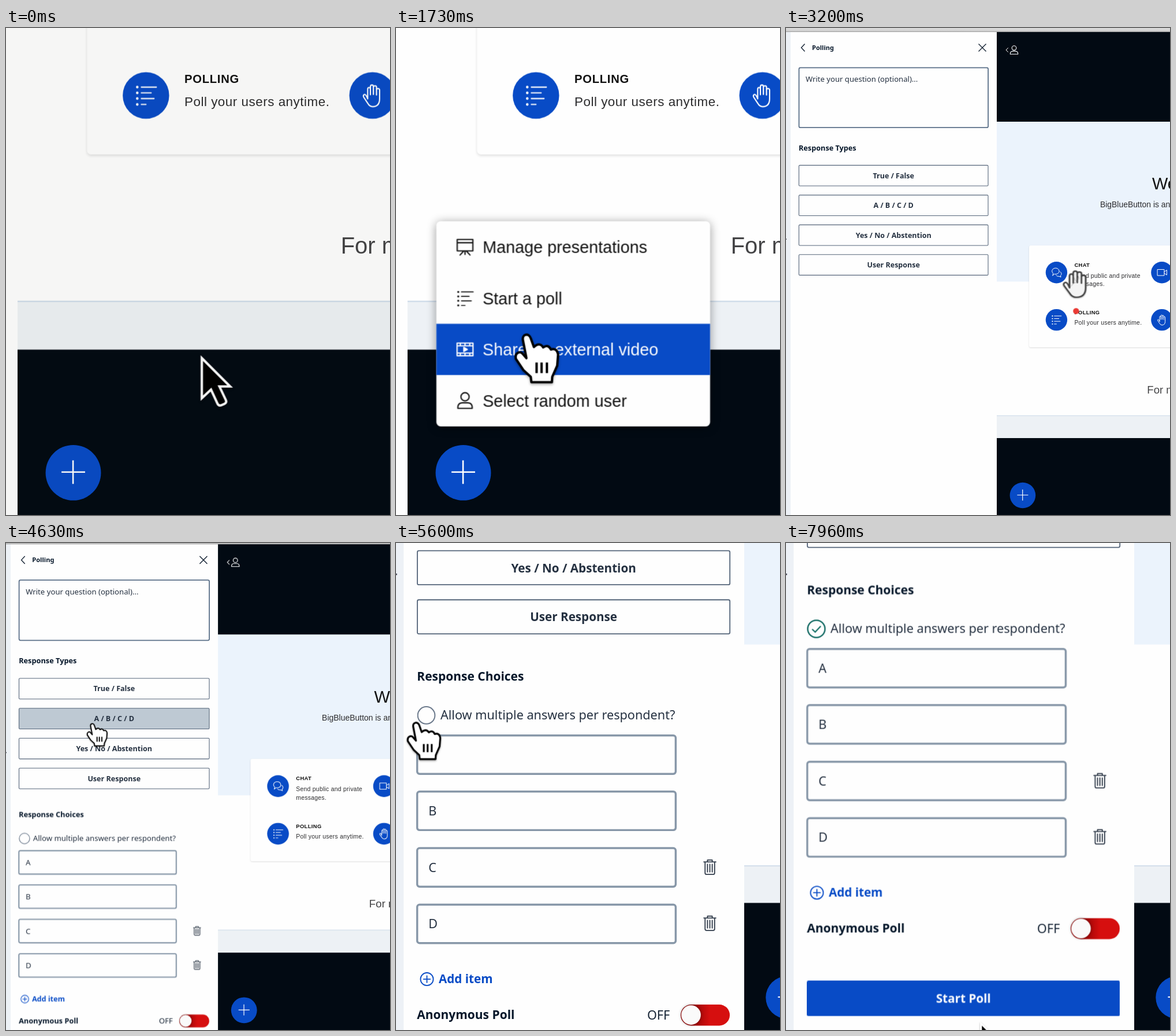
Recreate the animation shown at these times as an HTML page. Size 665 by 842 pixels, loop 8 s.

```html
<!DOCTYPE html>
<html lang="en">
<head>
<meta charset="utf-8">
<title>Starting a poll</title>
<style>
html, body { margin: 0; width: 100%; height: 100%; overflow: hidden; background: #fefefe; }
svg { display: block; }
text { white-space: pre; }
.slide { font-family: "Liberation Sans", Arial, sans-serif; fill: #2c2c2e; }
.panel { font-family: "Noto Sans", sans-serif; font-size: 13.1px; fill: #253141; }
.b { font-weight: 600; font-size: 12.5px; }
.head { fill: #06172a; font-size: 12.7px; }
.mid { text-anchor: middle; }
.tag { font-weight: 700; font-size: 9.4px; letter-spacing: .35px; fill: #111; }
.note { font-size: 10.4px; letter-spacing: .25px; }
.item { font: 13.4px "Liberation Sans", Arial, sans-serif; fill: currentColor; }
.line { fill: none; stroke: currentColor; stroke-linecap: round; stroke-linejoin: round; }
.btn { fill: #fefefe; stroke: #55657a; stroke-width: 1.1; }
.field { fill: #fefefe; stroke: #8797a8; stroke-width: 2.1; }

.cam, .cur, .dot, .menu, .scroll, .veil { animation: 8s infinite; }
.step { animation: 8s step-end infinite; }
.cam { animation-name: cam; }
.cur { animation-name: cur; animation-timing-function: cubic-bezier(.455, .03, .515, .955); }
.dot { animation-name: dot; animation-timing-function: linear; }
.menu { animation-name: menu; transform-origin: 410px 771px; }
.scroll { animation-name: scroll; animation-timing-function: ease-out; }
.veil { animation-name: veil; animation-timing-function: linear; }
.arrow { animation-name: arrow; }
.point { animation-name: point; }
.grab { animation-name: grab; }
.hot2 { animation-name: hot2; }
.hot3 { animation-name: hot3; }
.hot4 { animation-name: hot4; }
.pick { animation-name: pick; }
.choices { animation-name: choices; }
.tick { animation-name: tick; }

/* each zoom is a quadratic ease-in half followed by an ease-out half */
@keyframes cam {
  0%, 27.5% { transform: translate(-764.75px, -968.3px) scale(2.15); animation-timing-function: cubic-bezier(.3333, 0, .6667, .3333); }
  33.75% { transform: translate(-382.4px, -484.15px) scale(1.575); animation-timing-function: cubic-bezier(.3333, .6667, .6667, 1); }
  40%, 57.06% { transform: translate(0, 0) scale(1); animation-timing-function: cubic-bezier(.3333, 0, .6667, .3333); }
  63.31% { transform: translate(0, -274.5px) scale(1.326); animation-timing-function: cubic-bezier(.3333, .6667, .6667, 1); }
  69.56%, 100% { transform: translate(0, -549px) scale(1.652); }
}
@keyframes cur {
  0%, .5% { transform: translate(512.4px, 713.6px); }
  7.5%, 16.75% { transform: translate(411px, 807px); }
  23.25% { transform: translate(469.2px, 683px); }
  34.4% { transform: translate(469.2px, 683px); animation-timing-function: cubic-bezier(.3333, 0, .6667, .3333); }
  40% { transform: translate(502px, 440px); animation-timing-function: cubic-bezier(.3333, .6667, .6667, 1); }
  46.3%, 49.3% { transform: translate(150px, 332px); }
  52.5%, 57.3% { transform: translate(150px, 312px); }
  63.75% { transform: translate(148.5px, 534px); }
  70% { transform: translate(22.4px, 521.2px); }
  71.9%, 81.5% { transform: translate(32px, 508px); }
  85.1%, 95.2% { transform: translate(218.5px, 614px); }
  99.5%, 100% { transform: translate(203.4px, 833px); }
}
@keyframes dot {
  0%, 36.2% { transform: translate(478px, 665px); opacity: 0; }
  36.21% { transform: translate(478px, 665px); opacity: 1; }
  40% { transform: translate(503px, 490px); opacity: 1; }
  41.4% { transform: translate(430px, 425px); opacity: 1; }
  41.41%, 100% { transform: translate(430px, 425px); opacity: 0; }
}
@keyframes menu {
  0%, 8.5% { opacity: 0; transform: scale(.85); }
  10.5%, 27.5% { opacity: 1; transform: none; }
  29%, 100% { opacity: 0; transform: none; }
}
@keyframes scroll {
  0%, 87.5% { transform: translateY(0); }
  89.5%, 100% { transform: translateY(-90.5px); }
}
@keyframes veil { 0%, .75% { opacity: .035; } 6%, 100% { opacity: 0; } }
@keyframes arrow {
  0% { opacity: 1; } 6.25% { opacity: 0; } 8.5% { opacity: 1; }
  19.4% { opacity: 0; } 25.75% { opacity: 1; }
  35.63% { opacity: 0; } 41.4% { opacity: 1; }
  50.6% { opacity: 0; } 58.6% { opacity: 1; }
  68.5% { opacity: 0; } 82.5%, 100% { opacity: 1; }
}
@keyframes point {
  0% { opacity: 0; } 6.25% { opacity: 1; } 8.5% { opacity: 0; }
  19.4% { opacity: 1; } 25.75% { opacity: 0; }
  50.6% { opacity: 1; } 58.6% { opacity: 0; }
  68.5% { opacity: 1; } 82.5%, 100% { opacity: 0; }
}
@keyframes grab { 0% { opacity: 0; } 35.63% { opacity: 1; } 41.4%, 100% { opacity: 0; } }
@keyframes hot4 { 0% { opacity: 0; } 19.4% { opacity: 1; } 20.6%, 100% { opacity: 0; } }
@keyframes hot3 { 0% { opacity: 0; } 20.6% { opacity: 1; } 22.4%, 100% { opacity: 0; } }
@keyframes hot2 { 0% { opacity: 0; } 22.4%, 100% { opacity: 1; } }
@keyframes pick { 0% { fill: #fefefe; } 50.6% { fill: #dce4ec; } 54.45%, 100% { fill: #bec9d3; } }
@keyframes choices { 0% { opacity: 0; } 54.45%, 100% { opacity: 1; } }
@keyframes tick { 0% { opacity: 0; } 76.2%, 100% { opacity: 1; } }
</style>
</head>
<body>
<svg width="665" height="842" viewBox="0 0 665 842">
  <defs>
    <linearGradient id="bar" x2="0" y2="1">
      <stop offset="0" stop-color="#dcdcdc"/><stop offset=".7" stop-color="#d2d2d2"/><stop offset="1" stop-color="#9a9a9a"/>
    </linearGradient>
    <linearGradient id="red">
      <stop offset=".35" stop-color="#a80808"/><stop offset=".6" stop-color="#d60f0f"/>
    </linearGradient>
    <path id="palm" stroke-linecap="round" stroke-linejoin="round" d="M-4 2.5V-5.2Q-4-6.6-2.9-6.6T-1.8-5.2V-.8M-1.8-5.5V-7.2Q-1.8-8.6-.6-8.6T.6-7.2V-1M.6-6.6Q.6-8 1.9-8T3.1-6.6V-.6M3.1-4.6Q3.1-5.8 4.3-5.8T5.6-4.6V2.5Q5.6 8.8 0 8.8Q-2.5 8.8-4 6L-7.2 1.2Q-8-.4-6.6-1Q-5.4-1.3-4 2.5"/>
    <g id="list">
      <path class="line" d="M-3.7-6.7H8.4M-3.7-2.1H4.2M-3.7 2.5H6.5M-3.7 7.2H0"/>
      <path class="line" stroke-width="2.1" d="M-7-6.7h.01M-7-2.1h.01M-7 2.5h.01M-7 7.2h.01"/>
    </g>
    <g id="user" class="line">
      <circle cy="-3" r="3.3"/><path d="M-5.8 6.3Q-6 1.8-2 1.8H2Q6 1.8 5.8 6.3Z"/>
    </g>
    <g id="bin" class="line" stroke-width="1.1">
      <path d="M-6.3-5.5H6.3M-2.5-5.5V-7.5H2.5V-5.5M-5-5.5V6Q-5 7.5-3.5 7.5H3.5Q5 7.5 5 6V-5.5M-2.5-3V5M0-3V5M2.5-3V5"/>
    </g>
    <g id="r1">
      <g class="line" transform="translate(411.3 626.4)"><path d="M-6.3-6H6.3V3.2H-6.3ZM-6.3-3.4H6.3M0 3.2V6M-4 6.5L-1.2 3.4M4 6.5L1.2 3.4"/></g>
      <text class="item" x="425.5" y="631">Manage presentations</text>
    </g>
    <g id="r2">
      <use href="#list" transform="translate(411.3 667.8) scale(.78)"/>
      <text class="item" x="425.5" y="672.4">Start a poll</text>
    </g>
    <g id="r3">
      <g class="line" transform="translate(411.3 708.7)">
        <path d="M-6.4-5H6.4V5.2H-6.4ZM-6.4-2.8H6.4M-6.4 3H6.4M-3.8-5V-2.8M0-5V-2.8M3.8-5V-2.8M-3.8 3V5.2M0 3V5.2M3.8 3V5.2"/>
        <path d="M-1-1.5L1.8.1L-1 1.7Z" fill="currentColor"/>
      </g>
      <text class="item" x="425.5" y="713.6">Share an external video</text>
    </g>
    <g id="r4">
      <use href="#user" transform="translate(411.3 749.9)"/>
      <text class="item" x="425.5" y="754.8">Select random user</text>
    </g>
  </defs>

  <rect width="665" height="842" fill="#fefefe"/>
  <g class="cam">
    <!-- presentation -->
    <g class="slide">
      <rect x="365" y="6" width="305" height="157" fill="#020a13"/>
      <rect x="365" y="162" width="305" height="276.5" fill="#ebf3fc"/>
      <rect x="365" y="670" width="305" height="40" fill="#edf1f5"/>
      <rect x="365" y="669.7" width="305" height="1" fill="#cbd9e8"/>
      <rect x="365" y="709" width="305" height="140" fill="#020a13"/>
      <g color="#fff">
        <path class="line" d="M384.5 34.5L381 38L384.5 41.5"/>
        <use href="#user" transform="translate(395 38) scale(1.15)"/>
      </g>
      <text x="634" y="279" font-size="29" fill="#111">Welcome</text>
      <text x="544" y="310" font-size="13.9">BigBlueButton is an</text>
      <rect x="421" y="376" width="270" height="176" rx="3" fill="#fefefe" style="filter:drop-shadow(0 1px 1.2px #0002)"/>
      <g fill="#084bc6">
        <circle cx="468.4" cy="422.7" r="18.7"/><circle cx="468.4" cy="504.6" r="18.7"/>
        <circle cx="650.9" cy="422.7" r="18.7"/><circle cx="650.9" cy="504.6" r="18.7"/>
      </g>
      <g color="#fff">
        <g class="line" transform="translate(468.4 422.7)">
          <path d="M-6.6 5.2L-5.6 1.6C-10-2-7-7.6-1.6-7.6C5-7.6 7 0 1.2 2.4Q-1.5 3.2-3.6 2.8Z"/>
          <path d="M6.2-1.4C9.4.6 9.2 3.8 7 5.4L7.6 8L4.6 6.6C2 7 .2 6 -.6 4.8"/>
        </g>
        <use href="#list" transform="translate(468.4 504.6)"/>
        <path class="line" d="M643.5 417.5H655V428H643.5ZM655 421.5L659.5 418.5V427L655 424"/>
        <use href="#palm" class="line" x="651" y="504.8"/>
      </g>
      <text class="tag" x="499.4" y="412.6">CHAT</text>
      <text class="note" x="499.4" y="431.5">Send public and private</text>
      <text class="note" x="499.4" y="446.3">messages.</text>
      <text class="tag" x="499.4" y="494.5">POLLING</text>
      <text class="note" x="499.4" y="513">Poll your users anytime.</text>
      <text x="625.3" y="631.7" font-size="18.6" fill="#434345">For more information</text>
    </g>
    <circle cx="409.9" cy="808" r="22.3" fill="#084bc6"/>
    <path d="M400.4 807.5H419.4M409.7 798V817" stroke="#fff" stroke-width="1.2"/>

    <!-- poll panel -->
    <rect x="-5" width="370" height="850" fill="#fefefe"/>
    <rect x="-5" width="13" height="850" fill="#edf1f6"/>
    <rect x="-1" y="364.3" width="2" height="1.6" fill="#334"/>
    <g class="panel scroll">
      <path d="M32.5 27.5L26.5 34L32.5 40.5M333.5 27.5L346.5 40.5M346.5 27.5L333.5 40.5" fill="none" stroke="#142233" stroke-width="1.4"/>
      <text class="b head" x="45" y="38" style="font-size:11px">Polling</text>
      <rect x="22.5" y="68.6" width="327.6" height="103.6" rx="2.5" fill="#fefefe" stroke="#5b7089" stroke-width="1.8"/>
      <text x="34" y="93.3">Write your question (optional)...</text>
      <text class="b head" x="22" y="211.5">Response Types</text>
      <g class="b mid">
        <rect class="btn" x="22.4" y="237.4" width="327.6" height="35.6" rx="1.5"/>
        <rect class="btn step pick" x="22.4" y="288.9" width="327.6" height="35.6" rx="1.5"/>
        <rect class="btn" x="22.4" y="340.4" width="327.6" height="35.6" rx="1.5"/>
        <rect class="btn" x="22.4" y="391.8" width="327.6" height="35.6" rx="1.5"/>
        <text x="186.2" y="259.7">True / False</text>
        <text x="186.2" y="311.2">A / B / C / D</text>
        <text x="186.2" y="362.9">Yes / No / Abstention</text>
        <text x="186.2" y="414.2">User Response</text>
      </g>
      <g class="step choices">
        <text class="b head" x="22" y="476.3">Response Choices</text>
        <circle cx="31.8" cy="512.7" r="9" fill="#fefefe" stroke="#6b798b" stroke-width="1.2"/>
        <g class="step tick">
          <circle cx="31.8" cy="512.7" r="9" fill="#fefefe" stroke="#0b6a60" stroke-width="1.3"/>
          <path d="M27.4 513L30.6 516L36.4 509.8" fill="none" stroke="#0b6a60" stroke-width="1.3"/>
        </g>
        <text x="46.6" y="517.1">Allow multiple answers per respondent?</text>
        <rect class="field" x="22.2" y="533.7" width="271" height="40.3" rx="2.5"/>
        <rect class="field" x="22.2" y="592.5" width="271" height="40.3" rx="2.5"/>
        <rect class="field" x="22.2" y="651.7" width="271" height="40.3" rx="2.5"/>
        <rect class="field" x="22.2" y="710.8" width="271" height="40.3" rx="2.5"/>
        <text x="34" y="558.7">A</text>
        <text x="34" y="617.4">B</text>
        <text x="34" y="676.6">C</text>
        <text x="34" y="735.5">D</text>
        <g color="#2f3a49">
          <use href="#bin" x="329" y="671.6"/>
          <use href="#bin" x="329" y="730.3"/>
        </g>
        <g color="#084bc6">
          <path class="line" stroke-width="1.1" d="M28.9 788.8H35.9M32.4 785.3V792.3"/>
          <circle class="line" cx="32.4" cy="788.8" r="6.7" stroke-width="1.1"/>
          <text class="b" x="44.8" y="793" fill="currentColor">Add item</text>
        </g>
        <text class="b head" x="22" y="830.6">Anonymous Poll</text>
        <text x="263.3" y="831" fill="#142233">OFF</text>
        <rect x="298.4" y="815.4" width="51.5" height="22" rx="11" fill="url(#red)"/>
        <circle cx="309.3" cy="826.3" r="10.2" fill="#fafafa" style="filter:drop-shadow(0 0 1.6px #0007)"/>
        <rect x="22" y="881" width="328" height="37" rx="1.5" fill="#084bc6"/>
        <text class="b mid" x="186" y="904" fill="#fff">Start Poll</text>
      </g>
    </g>
    <rect x="-5" width="680" height="7" fill="url(#bar)"/>

    <!-- actions menu -->
    <g class="menu" color="#111">
      <rect x="388.2" y="605.7" width="220.5" height="165" rx="3.5" fill="#fefefe" style="filter:drop-shadow(0 1px 4px #0006)"/>
      <use href="#r1"/><use href="#r2"/><use href="#r3"/><use href="#r4"/>
      <g color="#fff" fill="#084bc6">
        <g class="step hot2"><rect x="388.2" y="647" width="220.5" height="41.2"/><use href="#r2"/></g>
        <g class="step hot3"><rect x="388.2" y="688.2" width="220.5" height="41.2"/><use href="#r3"/></g>
        <g class="step hot4"><rect x="388.2" y="729.4" width="220.5" height="41.2" rx="3"/><use href="#r4"/></g>
      </g>
    </g>

    <!-- pointers -->
    <g class="dot"><circle r="5.2" fill="#ea3a34"/></g>
    <g class="cur" style="filter:drop-shadow(0 1px 1px #0005)">
      <path class="step arrow" d="M1 2.2V34.4L8.4 27.5L13.6 38.8Q14.6 40.9 16.8 40L19.2 39Q21.2 38 20.4 36L15.2 25H23.8Z" fill="#000" stroke="#fff" stroke-width="1.9"/>
      <g class="step point" stroke="#000" stroke-width="1.9" stroke-linejoin="round">
        <path fill="#fff" d="M-4.3 3.5C-5.2-1.5.5-2.5 2 2L4.5 9Q9 4.8 12 9.3Q16 6.5 18.2 11Q23 9.5 24 15L23.3 24L19.3 33L19 37.3H2.5L2 33L-4 27.5L-10 18.5C-11 13.5-6.5 12-4.5 14.5L-1.5 18Z"/>
        <path d="M6.7 21.5V30M10.7 21.5V30M15 21.5V30"/>
      </g>
      <g class="step grab" fill="#f4f4f4" stroke="#444" stroke-width=".95">
        <use href="#palm" transform="translate(2 3) scale(2.9 2.6)"/>
      </g>
    </g>
  </g>
  <rect class="veil" width="665" height="842" fill="#2a2a14"/>
</svg>
</body>
</html>
```
